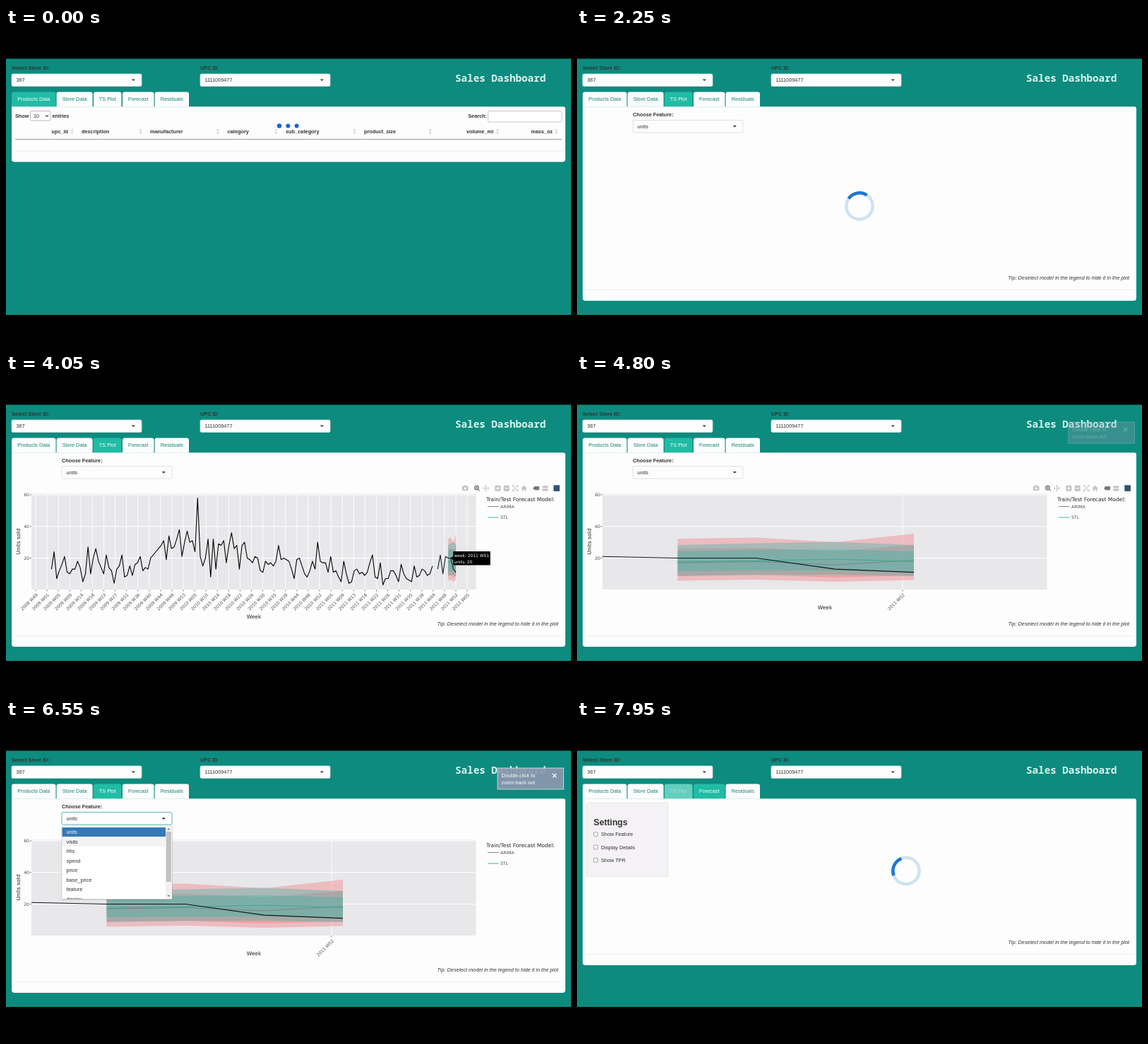
These frames come from a looping animation (800x450 px, 8 s). An HTML page:

```html
<!DOCTYPE html>
<html lang="en">
<head>
<meta charset="utf-8">
<title>Sales Dashboard</title>
<style>
html, body { margin: 0; width: 100%; height: 100%; overflow: hidden; background: #000; }
svg { display: block; width: 800px; height: 450px; }
text { font: 7.3px "Liberation Sans", Arial, sans-serif; fill: #333; white-space: pre; }
.b { font-weight: bold; }
.i { font-style: italic; }
.h { font-size: 12.2px; font-weight: bold; }
.end { text-anchor: end; }
.mid { text-anchor: middle; }
.white { fill: #fff; }
.title { font: bold 14.25px "Noto Sans Mono", "DejaVu Sans Mono", monospace; fill: #d9f6f1; }
.p { font: 7.5px "DejaVu Sans", Verdana, sans-serif; fill: #222; }
.tick { font: 6.1px "DejaVu Sans", Verdana, sans-serif; fill: #4d4d4d; }
.tip { font: 5.9px "DejaVu Sans", Verdana, sans-serif; fill: #fff; }
</style>
</head>
<body>
<svg id="stage" viewBox="0 0 800 450"></svg>
<script>
const TEAL = '#0d8b7e', PANEL = '#fdfdfe';

// ---------- markup helpers ----------
const rect = (x, y, w, h, fill, more = '') =>
  `<rect x="${x}" y="${y}" width="${w}" height="${h}" fill="${fill}" ${more}/>`;
const text = (x, y, s, cls = '', more = '') => `<text x="${x}" y="${y}" class="${cls}" ${more}>${s}</text>`;
const path = (d, stroke, w = 1, more = 'fill="none"') =>
  `<path d="${d}" stroke="${stroke}" stroke-width="${w}" ${more}/>`;
const shape = (d, fill) => `<path d="${d}" fill="${fill}"/>`;
const group = (id, body, more = '') => `<g id="${id}" ${more}>${body}</g>`;
const hline = (x1, x2, y, color) => path(`M${x1} ${y}H${x2}`, color);
const poly = pts => 'M' + pts.map(p => p.map(v => v.toFixed(2)).join(' ')).join('L');
const down = (x, y, r = 2.6) => shape(`M${x - r} ${y - r / 2}h${2 * r}l${-r} ${r}z`, '#333');

const select = (x, y, w, h, label, border = '#d5dbdc') =>
  rect(x, y, w, h, PANEL, `rx="2" stroke="${border}" stroke-width=".8"`) +
  text(x + 6.5, y + h / 2 + 2.7, label) + down(x + w - 11.7, y + h / 2);

const panel = bottom =>
  shape(`M8 111.3H789q3 0 3 3V${bottom - 4}q0 4 -4 4H12q-4 0 -4 -4z`, PANEL) +
  hline(13, 788, bottom - 15.5, '#ececee');

const spinner = (id, x, y) =>
  `<g transform="translate(${x} ${y})"><circle r="18.7" fill="none" stroke="#cfe3f0" stroke-width="4.5"/>` +
  group(id, path('M-13.2 13.2A18.7 18.7 0 0 1 -13.2 -13.2', '#1c78d0', 4.5)) + '</g>';

const plotTip = y => text(782, y, 'Tip: Deselect model in the legend to hide it in the plot', 'i end');

// ---------- tables ----------
// column: [name, text x, sort icon x, right aligned]
const productCols = [['upc_id', 88, 93.5, 1], ['description', 107, 190.5], ['manufacturer', 204, 300],
  ['category', 313.5, 382.5], ['sub_category', 396, 493.5], ['product_size', 507, 600.5],
  ['volume_ml', 690, 696, 1], ['mass_oz', 774, 779, 1]];
const storeCols = [['store_id', 62, 67.5, 1], ['store_name', 81, 132], ['address_city_name', 145.5, 226],
  ['address_state_prov_code', 239.5, 344], ['msa_code', 398, 403.5, 1], ['seg_value_name', 417, 487],
  ['parking_space_qty', 574, 579, 1], ['sales_area_size_num', 675.5, 681, 1], ['avg_weekly_baskets', 773.5, 779, 1]];

const pick = (list, i) => list[i % list.length];
const productRow = i => {
  const k = i % 3;
  return [1111009477 + i * 20 + k, ['MINI TWIST PRETZELS', 'HONEY OAT CEREAL', 'MINT MOUTH RINSE'][k],
    pick(['PRIVATE LABEL', 'HAVENMILL', 'TORVANE'], i + (i >> 2)), ['BAG SNACKS', 'COLD CEREAL', 'ORAL HYGIENE'][k],
    ['PRETZELS', 'ALL FAMILY CEREAL', 'MOUTHWASHES'][k], ['15 OZ', '12.25 OZ', '500 ML'][k],
    k == 2 ? 500 : '', k == 2 ? '' : k ? 12.25 : 15];
};
const storeRow = i => [367 + i * 22, pick(['ELMWICK', 'DUNHOLT', 'FARROW'], i), pick(['ELMWICK', 'DUNHOLT', 'FARROWDALE'], i),
  pick(['OH', 'TX', 'KY'], i), 17140 + i % 3 * 1050, pick(['VALUE', 'MAINSTREAM', 'UPSCALE'], i + (i >> 1)),
  250 + i * 37 % 200, 24721 + i * 5309 % 30000, 12706 + i * 3571 % 14000];

const sortIcon = x => shape(`M${x - 2} 145.6h4l-2 -3.4zM${x - 2} 147.2h4l-2 3.4z`, '#d4d4d8');

const tableHead = cols =>
  text(13, 126.7, 'Show', 'b') + rect(34.5, 117.5, 28.5, 13.5, '#fff', 'rx="1.5" stroke="#aaa" stroke-width=".8"') +
  text(39, 127, '10') + path('M56 123.3l2 2l2 -2', '#333', 1.1) + text(65.5, 126.7, 'entries', 'b') +
  text(681, 127.3, 'Search:', 'b end') +
  rect(682.5, 117.5, 104.5, 15.5, '#fff', 'rx="1.5" stroke="#bbb" stroke-width=".8"') +
  cols.map(([name, x, icon, right]) => text(x, 149, name, right ? 'b end' : 'b') + sortIcon(icon)).join('') +
  hline(13, 787, 157.5, '#999');

function tableBody(cols, row, info) {
  const step = 19.2;
  let out = '';
  for (let i = 0; i < 10; i++) {
    const y = 158 + i * step;
    out += rect(13, y, 774, step, i % 2 ? PANEL : '#f8f8f9') + hline(13, 787, y + step, '#e2e2e4') +
      row(i).map((v, c) => text(cols[c][1], y + 12.3, v, cols[c][3] ? 'end' : '')).join('');
  }
  out += hline(13, 787, 350, '#999') + text(13, 364, info) + text(666, 366, 'Previous');
  for (let n = 1; n < 6; n++) out += text(691 + n * 14, 366, n);
  return out + rect(700, 355.5, 14, 16, 'none', 'stroke="#aaa" stroke-width=".7"') + text(773, 366, 'Next');
}

const dots = [387, 399.3, 411.6].map(x => `<circle class="dot" cx="${x}" cy="138.5" fill="#1a62cf"/>`).join('');

// ---------- chart ----------
const train = [
  13, 24, 7, 12, 16, 21, 11, 10, 13, 13, 18, 14, 5, 10, 27, 10, 20, 26, 18, 14,
  10, 22, 14, 12, 4, 13, 15, 22, 8, 9, 15, 9, 16, 17, 21, 12, 14, 13, 20, 22,
  24, 26, 28, 31, 19, 34, 26, 27, 32, 38, 21, 30, 37, 30, 31, 24, 58, 21, 15, 20,
  32, 8, 32, 13, 29, 28, 31, 17, 28, 36, 26, 28, 13, 28, 30, 20, 19, 17, 21, 20,
  12, 11, 18, 16, 17, 15, 18, 28, 19, 20, 19, 18, 13, 7, 19, 20, 15, 10, 8, 12,
  18, 13, 30, 18, 17, 17, 11, 21, 11, 12, 8, 5, 18, 10, 4, 5, 12, 13, 10, 11,
  9, 11, 17, 22, 8, 7, 17, 3, 7, 7, 12, 12, 9, 5, 16, 10, 7, 6, 5, 15,
  8, 9, 13, 12, 9, 10, 15];
const test = [13, 22, 10, 21, 20, 20, 13, 11];
const testStart = 148, forecastStart = 152;
const units = i => i < testStart ? train[Math.min(i, train.length - 1)] : test[i - testStart];
const weekName = i => {
  const [year, w] = i < 51 ? [2009, i + 3] : i < 103 ? [2010, i - 50] : [2011, i - 102];
  return `${year} W${String(w).padStart(2, '0')}`;
};
const Y = v => 305.2 - 2.237 * v;

// [upper, lower] pixel heights at the four forecast weeks
const bands = [
  ['#f26f74', [233, 231.5, 238, 226], [292.5, 291, 294, 291.5]],
  ['#f26f74', [247, 246, 251, 241.5], [285.5, 284, 288, 285]],
  ['#2fb3a6', [242, 239.5, 237.5, 242], [286, 284.5, 284, 286]],
  ['#2fb3a6', [251, 249, 248, 251], [279, 278, 278, 280]]];
const means = [['#7f8685', [267.3, 265.5, 270, 263.5]], ['#3fa79c', [266, 264.5, 262, 265.5]]];

const yearTicks = {
  2008: '49', 2009: '01 05 09 14 18 23 27 31 36 40 44 49 53', 2010: '05 10 14 18 22 26 30 35 39 44 48 52',
  2011: '05 09 13 18 22 26 31 35 39 44 48 52', 2012: '05'};
const ticks = Object.entries(yearTicks).flatMap(([y, ws]) => ws.split(' ').map(w => `${y} W${w}`));

function chart(X, marks, lw, titleY) {
  const line = (ys, from) => poly(ys.map((y, k) => [X(from + k), y]));
  const axis = marks.map(([x, s]) => path(`M${x} 305v2.5`, '#555', .7) +
    text(0, 0, s, 'tick end', `transform="translate(${x + 3.4} 313) rotate(-45)"`)).join('');
  const grid = marks.map(([x]) => path(`M${x} 169.5V305`, '#fff', .9)).join('');
  const ribbons = bands.map(([c, up, low]) => {
    const edge = ys => ys.map((y, k) => [X(forecastStart + k), y]);
    return `<path d="${poly([...edge(up), ...edge(low).reverse()])}z" fill="${c}" opacity=".36"/>`;
  }).join('');
  return grid + axis + text(351, titleY, 'Week', 'p mid') +
    `<g clip-path="url(#area)" stroke-linejoin="round">` + ribbons +
    means.map(([c, ys]) => path(line(ys, forecastStart), c, lw)).join('') +
    path(line(train.map(Y), 0), '#000', 1.1) + path(line(test.map(Y), testStart), '#0b1a18', 1.1) + '</g>';
}
const fullX = i => 64.4 + 3.695 * i;
const zoomX = i => 477 + 111.5 * (i - 155);

const frame = rect(36, 169.5, 629.5, 135.5, '#e8e7ea') +
  [20, 40, 60].map(v => hline(36, 665.5, Y(v), '#fff') + path(`M33.5 ${Y(v)}h2.5`, '#555', .7) +
    text(33, Y(v) + 2.3, v, 'tick end')).join('') +
  text(0, 0, 'Units sold', 'p mid', 'transform="translate(20.3 237) rotate(-90)"') +
  text(680, 180, 'Train/Test Forecast Model:', 'p') +
  hline(682, 697.5, 187.5, '#858585') + text(700, 189.8, 'ARIMA', 'tick') +
  hline(682, 697.5, 203, '#45b0a4') + text(700, 205.2, 'STL', 'tick');

const gray = '#c3c2c6', dark = '#77767b';
const box = (x, sign) => rect(x - 4, 157.7, 8, 8, gray, 'rx="1"') + path(`M${x - 2.2} 161.7h4.4` + sign, '#fff', 1.2);
const modebar =
  rect(646, 158.6, 8.5, 6.4, gray, 'rx="1"') + rect(648.5, 157.6, 3.5, 2, gray) +
  `<circle cx="650.2" cy="161.9" r="1.7" fill="#fff"/>` +
  `<circle cx="666.4" cy="161" r="2.8" fill="none" stroke="${dark}" stroke-width="1.4"/>` +
  path('M668.5 163l2.4 2.6M665 161h2.8M666.4 159.6v2.8', dark, 1.1) +
  path('M675.5 161.7h8M679.5 157.7v8M677 160l-1.8 1.7 1.8 1.7M682 160l1.8 1.7 -1.8 1.7M678 159l1.5 -1.7 1.5 1.7M678 164.4l1.5 1.7 1.5 -1.7', gray, .9) +
  box(696.3, 'm-2.2 -2.2v4.4') + box(708.7, '') +
  path('M717.5 160v-2.3h2.3M722.6 157.7h2.3v2.3M724.9 163.4v2.3h-2.3M719.8 165.7h-2.3v-2.3M718 158.2l6.4 7M724.4 158.2l-6.4 7', gray, 1) +
  shape('M729.3 162l4.3 -4.2 4.3 4.2h-1.3v3.6h-2v-2.4h-2v2.4h-2V162z', gray) +
  shape('M746 161.7l2.3 -2.6h6.7v5.2h-6.7z', dark) +
  shape('M759 160.2l1.3 -2h7v3h-7zM759 163.8l1.3 -1.6h7v3.2h-7z', gray) +
  rect(775.3, 157.3, 8.6, 8.6, '#33506f');

const features = ['units', 'visits', 'hhs', 'spend', 'price', 'base_price', 'feature', 'display'];
const dropdown =
  rect(79, 130.5, 156, 17.5, PANEL, 'rx="2" stroke="#5bbdae" stroke-width="1"') + text(85.5, 141.6, 'units') +
  shape('M220.7 140.2h5.2l-2.6 -2.6z', '#333') +
  rect(78.5, 150, 157.5, 105, '#000', 'opacity=".12" rx="2"') +
  rect(79, 150, 156, 103.5, '#fff', 'stroke="#ccc" stroke-width=".6"') +
  rect(79.5, 152, 146.5, 13.3, '#337ab7') + group('hoverRow', rect(79.5, 165.3, 146.5, 13.6, '#f3f3f4')) +
  `<g clip-path="url(#list)">` +
  features.map((f, i) => text(85.5, 161.2 + i * 13.5, f, i ? '' : 'white')).join('') + '</g>' +
  rect(226, 150.3, 8.7, 103, '#f1f1f1') + rect(226.8, 158, 7, 71, '#c1c1c1') +
  shape('M228.3 155.3h4l-2 -2zM228.3 248h4l-2 2z', '#666');

const note = rect(696, 68, 93.5, 30, '#8c97af', 'stroke="#dfe5ea" stroke-width=".8" fill-opacity=".92"') +
  text(701.5, 80.6, 'Double-click to', 'white') + text(701.5, 90.7, 'zoom back out', 'white') +
  path('M774 76l5.4 5.4M779.4 76l-5.4 5.4', '#fff', 1.3);

const tsPanel = panel(386) + text(79, 124.7, 'Choose Feature:', 'b') +
  select(79, 130.5, 156, 17.5, 'units') + plotTip(356);

const settings = panel(347) + rect(13, 117, 116, 104.5, '#f4f2f5', 'rx="1.5" stroke="#e1e0e3" stroke-width=".7"') +
  text(23.5, 149.3, 'Settings', 'h') +
  ['Show Feature', 'Display Details', 'Show TPR'].map((s, i) =>
    rect(23.7, 158.8 + i * 18.4, 5.6, 5.6, '#fff', 'rx="1" stroke="#777" stroke-width=".7"') +
    text(34, 164.3 + i * 18.4, s)).join('') +
  spinner('spin2', 466, 213.5) + plotTip(317);

// ---------- tabs: [label, x, width, hover time, time it is left] ----------
const tabs = [['Products Data', 8, 62.5, -500, 1100], ['Store Data', 71.6, 51, 900, 2009],
  ['TS Plot', 124, 39.5, 1930, 7877], ['Forecast', 165, 44.5, 7780, 9000], ['Residuals', 210.6, 48.4, 9000, 9000]];
const tabMarkup = tabs.map(([s, x, w], i) => group('tab' + i,
  shape(`M${x} 111.5V93.5q0 -3 3 -3h${w - 6}q3 0 3 3v18z`, 'currentColor') + text(x + w / 2, 103.3, s, 'mid'))).join('');

const $ = id => document.getElementById(id);
$('stage').innerHTML =
  `<defs><clipPath id="area">${rect(36, 169.5, 629.5, 135.5, '#000')}</clipPath>` +
  `<clipPath id="list">${rect(79, 150, 147, 103.3, '#000')}</clipPath></defs>` +
  rect(0, 0, 800, 450, '#000') + rect(0, 43.5, 800, 362.5, TEAL) +
  text(8, 59.3, 'Select Store ID:', 'b') + select(8, 65, 184, 17.5, '367') +
  text(275, 59.3, 'UPC ID', 'b') + select(275, 65, 184, 17.5, '1111009477') +
  text(636, 76, 'Sales Dashboard', 'title') + tabMarkup +
  group('load1', panel(189.5) + tableHead(productCols) + dots) +
  group('table1', panel(396.5) + tableHead(productCols) + tableBody(productCols, productRow, 'Showing 1 to 10 of 58 entries')) +
  group('load2', panel(189.5) + tableHead(storeCols) + dots) +
  group('table2', panel(396.5) + tableHead(storeCols) + tableBody(storeCols, storeRow, 'Showing 1 to 10 of 79 entries')) +
  group('ts', tsPanel) + group('wait', spinner('spin1', 400, 252)) + group('frame', frame) +
  group('full', chart(fullX, ticks.map((s, k) => [42 + 16.08 * k, s]), .6, 345.5)) +
  group('zoom', chart(zoomX, [[461, '2011 W52']], 1, 333)) +
  group('drag', rect(36, 169.5, 586.4, 135.5, '#000', 'opacity=".2"') + '<rect id="dragRest" y="169.5" height="135.5" opacity=".2"/>') +
  group('tip', shape('M0 0l3.5 -3v-6.5h52.5v19.5h-52.5v-7z', '#000') + text(4.8, -1.4, '', 'tip', 'id="tipWeek"') +
    text(4.8, 7.4, '', 'tip', 'id="tipUnits"')) +
  group('modebar', modebar) + group('list1', dropdown) + group('forecast', settings) + group('note', note);

// ---------- timeline ----------
const scenes = [['load1', 0, 420], ['table1', 420, 1100], ['load2', 1100, 1520], ['table2', 1520, 2009],
  ['ts', 2009, 7877], ['wait', 2009, 2620], ['frame', 2620, 7877], ['full', 2620, 4550], ['zoom', 4550, 7877],
  ['drag', 4400, 4550], ['tip', 3700, 4400], ['list1', 6100, 6950], ['hoverRow', 6350, 6950], ['forecast', 7877, 8000]];
const ramp = (t, from, to) => Math.max(0, Math.min(1, (t - from) / (to - from)));
const mix = (a, b, k) => `rgb(${a.map((v, i) => Math.round(v + (b[i] - v) * k))})`;
const white = [252, 253, 253], active = [33, 188, 165], ink = [20, 130, 115];
const dotList = document.querySelectorAll('.dot');

function render() {
  const t = performance.now() % 8000;
  for (const [id, from, to] of scenes) $(id).style.display = t >= from && t < to ? '' : 'none';

  tabs.forEach(([, , , over, left], i) => {
    const k = ramp(t, over, over + 70) * (1 - ramp(t, left, left + 250)), tab = $('tab' + i);
    tab.style.color = mix(white, active, k);
    tab.lastChild.style.fill = mix(ink, white, k);
  });

  dotList.forEach((d, i) => d.setAttribute('r', 3.2 + .25 * Math.sin(t / 175 - i * .8)));
  $('spin1').setAttribute('transform', `rotate(${(t - 2009) / 1100 * 360})`);
  $('spin2').setAttribute('transform', `rotate(${(t - 7877) / 1100 * 360})`);

  const i = Math.round(122 + 31 * ramp(t, 3700, 4020));
  $('tip').setAttribute('transform', `translate(${fullX(i)} ${Y(units(i))})`);
  $('tipWeek').textContent = 'week: ' + weekName(i);
  $('tipUnits').textContent = 'units: ' + units(i);

  const x = 622.4 + 21 * ramp(t, 4400, 4530);
  $('dragRest').setAttribute('x', x);
  $('dragRest').setAttribute('width', 665.5 - x);

  $('modebar').style.opacity = ramp(t, 2950, 3250) * (1 - ramp(t, 5600, 5900)) + ramp(t, 6950, 7100) * (1 - ramp(t, 7300, 7600));
  $('note').style.opacity = ramp(t, 4550, 5250) * (1 - ramp(t, 7100, 7700));
  requestAnimationFrame(render);
}
render();
</script>
</body>
</html>
```
